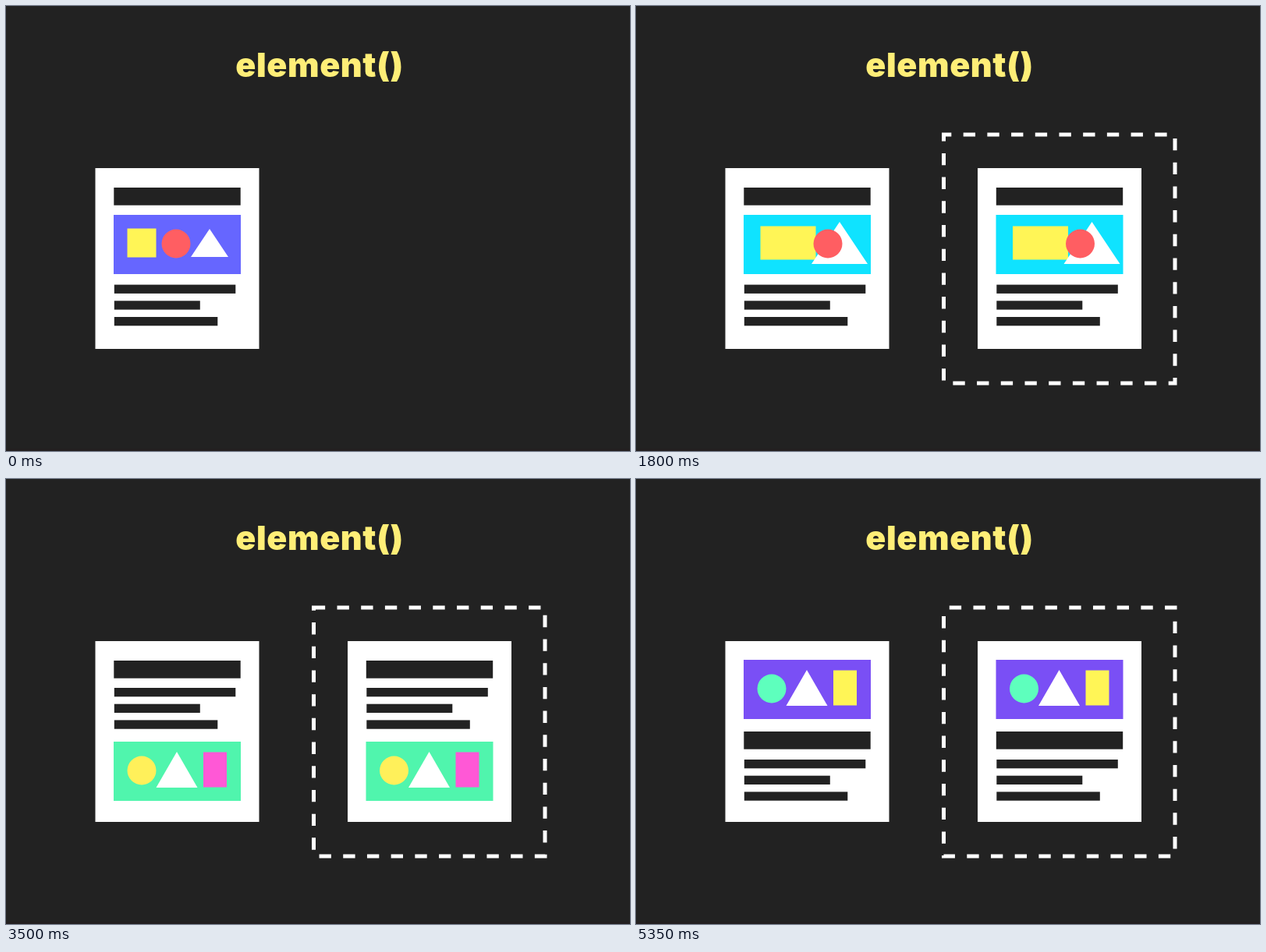
An HTML page with a canvas for the animation above (5.4 s loop, 800 px wide and 571 px high).

```html
<!DOCTYPE html>
<html lang="en">
<head>
<meta charset="utf-8">
<title>element()</title>
<style>
  html, body { margin: 0; width: 100%; height: 100%; overflow: hidden; background: #222; }
  canvas { display: block; }
</style>
</head>
<body>
<canvas id="stage" width="800" height="571"></canvas>
<script>
const ctx = document.getElementById('stage').getContext('2d');
const LOOP = 5400, STEP = 50, DARK = '#222222';
const COPY_X = 323.5, LAG = 6;
const PEEL_START = 740, PEEL_END = 1530;
const PAGE = [114.5, 208, 210, 232];
const MIDDLE = [219.5, 324];

// Each scene names only what it changes, and eases there from the scene before.
// tops: banner, title, text. box: centre, width, height. tri: centre, half width, height.
const scenes = [
  { at: 0, banner: [102, 102, 255], discFill: [255, 94, 98], boxFill: [255, 245, 86],
    tops: [268, 233, 357.6], box: [36, 37, 37], disc: [80], tri: [123, 24, 36] },
  { at: 1530, dur: 250, banner: [15, 227, 255], box: [57, 71, 43], disc: [108], tri: [123, 36, 54] },
  { at: 2090, dur: 400, stagger: 240, banner: [43, 211, 132],
    box: [130, 30, 45], disc: [36], tri: [81, 26.5, 46] },
  { at: 2800, dur: 420, banner: [80, 245, 173], discFill: [255, 240, 90], boxFill: [255, 88, 214],
    tops: [337, 233, 268] },
  { at: 3600, dur: 400, banner: [122, 79, 245], discFill: [94, 255, 189], boxFill: [255, 245, 86],
    tops: [232, 324, 360] }
];
const order = { box: 0.7, disc: 1 };

function tween(t, start, dur) {
  const p = Math.min(1, Math.max(0, (t - start) / dur));
  return p * p * (3 - 2 * p);
}

function value(key, t) {
  let now = scenes[0][key];
  for (const { at, dur, stagger = 0, [key]: next } of scenes.slice(1)) {
    if (!next) continue;
    const p = tween(t, at + stagger * (order[key] || 0), dur);
    now = now.map((v, i) => v + (next[i] - v) * p);
  }
  return now;
}
const color = (key, t) => `rgb(${value(key, t).map(Math.round)})`;

function bar(g, x, y, w, h, fill = DARK) {
  g.fillStyle = fill;
  g.fillRect(x, y, w, h);
}

function drawPage(g, t) {
  const [bannerY, titleY, textY] = value('tops', t);
  const squeeze = 1.48 * (tween(t, 4000, 240) - tween(t, 4450, 630));
  const [x, y, w, h] = PAGE;
  bar(g, x, y, w - 38 * squeeze, h, '#fff');
  bar(g, 138.3, titleY, 162.4 - 38.5 * squeeze, 22.7);
  [155.5, 110, 132.5].forEach((len, i) =>
    bar(g, 138.8, textY + i * 20.7, len * (1 - 0.17 * squeeze), 11.3));
  bar(g, 138, bannerY, 163 - 40 * squeeze, 76, color('banner', t));

  const shapes = {
    box() {
      const [mid, w, h] = value('box', t);
      bar(g, mid - w / 2 - 41 * squeeze, 36 - h / 2, w, h, color('boxFill', t));
    },
    disc() {
      g.fillStyle = color('discFill', t);
      g.beginPath();
      g.arc(value('disc', t)[0], 37, 18.5, 0, 7);
      g.fill();
    },
    tri() {
      const [mid, half, h] = value('tri', t);
      g.fillStyle = '#fff';
      g.beginPath();
      for (const side of [-1, 0, 1])
        g.lineTo(mid - 21 * squeeze + side * half, 36 + (side ? h : -h) / 2);
      g.fill();
    }
  };
  const stack = ['box', 'tri', 'disc'];
  if (t >= scenes[3].at) stack.reverse();
  g.save();
  g.translate(138, bannerY);
  stack.forEach(name => shapes[name]());
  g.restore();
}

function drawFrame(t) {
  ctx.save();
  ctx.globalAlpha = tween(t, 0, 500);
  ctx.strokeStyle = '#fff';
  ctx.lineWidth = 5;
  ctx.setLineDash([15.35, 15.35]);
  ctx.lineDashOffset = -(9.5 + 0.0209 * (t - 1050));
  ctx.strokeRect(394.5, 165, 296.5, 319);
  ctx.restore();
}

// The copy unrolls around a cylinder whose axis sweeps to the right.
// It is built in pixel columns, upright and at double size, then tilted as a whole.
const roll = document.createElement('canvas');
roll.width = 1280;
roll.height = 800;
const rollCtx = roll.getContext('2d');

function drawPeel(t) {
  const p = (1 - Math.cos(Math.PI * (t - PEEL_START) / (PEEL_END - PEEL_START))) / 2;
  const tilt = Math.PI / 20 * Math.sin(Math.PI * p);
  const foldX = 306 + 344 * p, foldY = MIDDLE[1];
  const r = 49, half = Math.PI * r, column = 0.5;
  const g = rollCtx;

  // Paper between distances s0 and s1 from the fold is shown between x0 and x1.
  function strip(x0, x1, s0, s1, shade = 0) {
    g.save();
    g.beginPath();
    g.rect(x0, -200, x1 - x0, 400);
    g.clip();
    g.translate(x0, 0);
    g.scale((x1 - x0) / (s1 - s0), 1);
    g.translate(-s0, 0);
    g.rotate(-tilt);
    g.translate(COPY_X - foldX, -foldY);
    drawPage(g, t);
    bar(g, ...PAGE, `rgba(0,0,0,${shade})`);
    g.restore();
  }
  function curl(place, dark) {
    for (let x = 0; x < r; x += column) {
      const [s0, s1] = [x, x + column].map(v => place(r * Math.asin(v / r)));
      strip(x, x + column, s0, s1, dark * (x / r) ** 4);
    }
  }

  g.setTransform(1, 0, 0, 1, 0, 0);
  g.clearRect(0, 0, roll.width, roll.height);
  g.setTransform(2, 0, 0, 2, roll.width / 2, roll.height / 2);
  strip(-320, 0, -320, 0);
  curl(s => s, 0.25);
  curl(s => half - s, 0.75);
  strip(-320, 0, half + 320, half);

  ctx.save();
  ctx.translate(foldX, foldY);
  ctx.rotate(tilt);
  ctx.drawImage(roll, -320, -200, 640, 400);
  ctx.restore();
}

function render(t) {
  bar(ctx, 0, 0, 800, 571);
  bar(ctx, 0, 568, 800, 3, '#231f20');
  ctx.fillStyle = '#ffee77';
  ctx.font = '900 43px Inter, "Open Sans", sans-serif';
  ctx.letterSpacing = '0.6px';
  ctx.textAlign = 'center';
  ctx.fillText('element()', 402, 91);

  const scale = 1 + 0.008 * (tween(t, 600, 200) - tween(t, 1300, 300));
  ctx.save();
  ctx.translate(...MIDDLE);
  ctx.scale(scale, scale);
  ctx.translate(-MIDDLE[0], -MIDDLE[1]);
  drawPage(ctx, t);
  ctx.restore();

  drawFrame(t);
  if (t >= PEEL_END) {
    ctx.save();
    ctx.translate(COPY_X, 0);
    drawPage(ctx, t - LAG);
    ctx.restore();
  } else if (t >= PEEL_START) {
    drawPeel(t);
  }
}

const start = performance.now();
function tick() {
  const t = (performance.now() - start) % LOOP;
  render(Math.floor(t / STEP) * STEP);
  requestAnimationFrame(tick);
}
tick();
</script>
</body>
</html>
```
